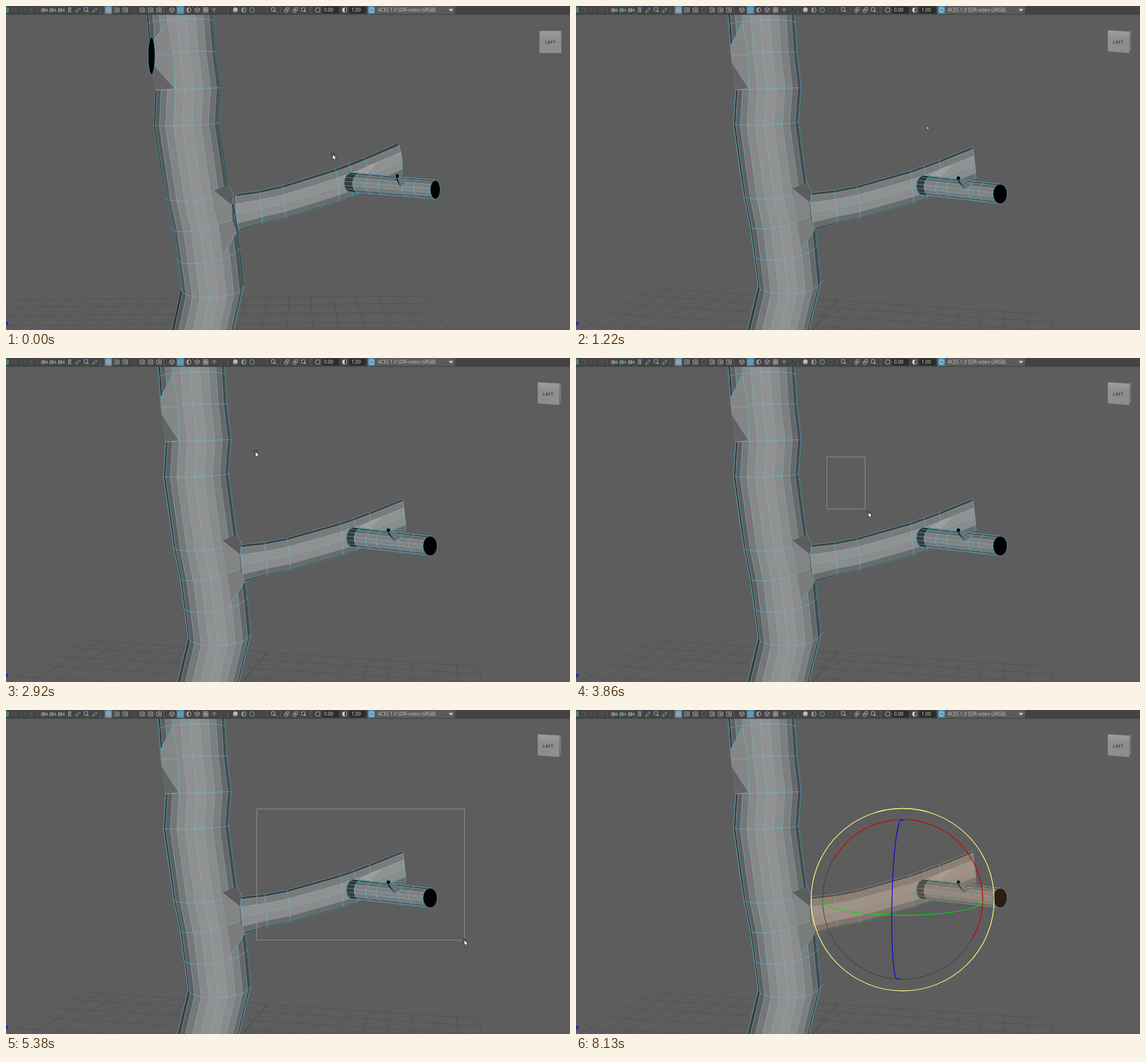
Animation, 986 px wide and 568 px high, one loop 9500 ms. Source, as an HTML page with a canvas:

```html
<!DOCTYPE html>
<html lang="en">
<head>
<meta charset="utf-8">
<title>Branch selection</title>
<style>
html, body { margin: 0; width: 100%; height: 100%; overflow: hidden; background: #5d5d5d; }
canvas, svg { position: absolute; left: 0; top: 0; width: 986px; height: 568px; }
text { font: 8.2px "Open Sans", "Noto Sans", sans-serif; fill: #e2e2e2; }
.mid { text-anchor: middle; }
</style>
</head>
<body>
<canvas id="view" width="986" height="568"></canvas>
<svg id="ui" viewBox="0 0 986 568"></svg>
<script>
const LOOP = 9500, TICK = 138.2;
const ctx = document.getElementById('view').getContext('2d');
const ui = document.getElementById('ui');
const lerp = (a, b, t) => a + (b - a) * t;
const mix = (a, b, t) => a.map((v, i) => Array.isArray(v) ? mix(v, b[i], t) : lerp(v, b[i], t));

// away: 1 before the camera orbit, 0 after it
let away = 1, selected = false;

const gray = g => selected
  ? `rgb(${.8 * g + 46},${.8 * g + 29},${.8 * g + 18})`
  : `rgb(${g},${g},${g})`;
const wire = () => selected ? 'rgba(112,178,188,.75)' : 'rgba(104,196,220,.75)';
const light = angle => 146 * Math.sin(Math.PI * angle) ** .62;

function poly(points, fill, stroke, width = .8, closed = true) {
  ctx.beginPath();
  points.forEach(p => ctx.lineTo(p[0], p[1]));
  if (closed) ctx.closePath();
  if (fill) {
    ctx.fillStyle = fill;
    ctx.fill();
  }
  if (stroke) {
    ctx.strokeStyle = stroke;
    ctx.lineWidth = width;
    ctx.stroke();
  }
}
const line = (...points) => poly(points, null, wire(), .8, false);

function disc(x, y, rx, ry) {
  ctx.beginPath();
  ctx.ellipse(x, y, rx, ry, 0, 0, 7);
  ctx.fillStyle = gray(0);
  ctx.fill();
  ctx.strokeStyle = wire();
  ctx.lineWidth = .9;
  ctx.stroke();
}

// Edge angles across the visible half of a tube, 0 to 1.
function edges(phase, gap) {
  const out = [0];
  for (let a = phase; a < .99; a += gap) if (a > .01) out.push(a);
  return [...out, 1];
}

const ring = (a, b, bowX, bowY, angles) => angles.map(t => {
  const f = (1 - Math.cos(Math.PI * t)) / 2, bow = Math.sin(Math.PI * t);
  return [lerp(a[0], b[0], f) + bowX * bow, lerp(a[1], b[1], f) + bowY * bow];
});

function tube(rows, angles, tone = () => 1) {
  for (let i = 0; i + 1 < rows.length; i++) {
    for (let j = 0; j + 1 < angles.length; j++) {
      const c = gray(light((angles[j] + angles[j + 1]) / 2) * tone(i));
      poly([rows[i][j], rows[i][j + 1], rows[i + 1][j + 1], rows[i + 1][j]], c, c, .6);
    }
  }
  rows.forEach(row => line(...row));
  angles.forEach((_, j) => line(...rows.map(row => row[j])));
}

function drawFloor() {
  const [a, b, c, d] = mix([[135, 494], [827, 541], [5, 568], [843, 615]],
    [[15, 515], [732, 508], [-105, 590], [783, 583]], away);
  for (let i = 0; i <= 20; i++) {
    const u = i / 20, s = u / (u + (1 - u) * 1.15);
    line.call(null);
    poly([mix(a, b, s), mix(c, d, s)], null, i === 10 ? '#3c3c3c' : '#4f4f4f', .8, false);
  }
  for (let i = 0; i < 5; i++) {
    const s = .165 * i + .013 * i * i;
    poly([mix(a, c, s), mix(b, d, s)], null, '#4f4f4f', .8, false);
  }
}

const swingTrunk = ([x, y]) => [x - (20 - .016 * y) * away, y + .02 * (y - 130) * away];

function drawTrunk() {
  const outline = [[265, 12], [267, 33], [271, 86], [279, 147], [275, 207], [293, 332], [304, 385], [311, 437], [318, 489], [294, 589]];
  const angles = edges(.03 - .022 * away, .091);
  tube(outline.map(([x, y]) => {
    const tilt = 4 + 22 * Math.exp(-(((y - 400) / 60) ** 2));
    return ring(swingTrunk([x, y]), swingTrunk([x + 117 - .013 * y, y - tilt]), 0, .055 * y - 8, angles);
  }), angles);

  const wide = ([x, y]) => swingTrunk([x + 11 * away, y]);
  const rim = [[270, 70], [271, 86], [272, 98], [279, 147]].map(swingTrunk);
  const [top, side, low] = [[291, 30], [301, 86], [302, 145]].map(wide);
  poly([rim[0], top, side, low, rim[2]], gray(134));
  poly([rim[2], low, rim[3]], gray(100));
  line(rim[0], top, side, low, rim[2]);
  line(rim[1], side);
  line(low, rim[3]);
  const hole = swingTrunk([273, 88]);
  if (away > .1) disc(hole[0], hole[1], 6 * away, 33);

  const [crest, notch, top0, mid, mid2, low0, tail, inner] = [[378, 320], [404, 310], [413, 327], [409, 345],
    [410, 370], [417, 392], [394, 428], [386, 377]].map(swingTrunk);
  poly([crest, notch, top0, mid], gray(92));
  poly([crest, mid, mid2, inner], gray(132));
  poly([inner, mid2, low0, tail], gray(124));
  line(notch, top0, mid, crest);
  line(inner, mid2);
  line(low0, tail);
}

function drawBranch() {
  const angles = edges(.18, .175);
  const rows = [0, 38, 78, 171, 195, 222, 280].map(u => {
    const x = 413 + u - 9 * away, y = 327 - .0171 * u ** 1.5 + (2 - .03 * u) * away;
    return ring([x, y], [x + 6, y + (u ? 57 : 65)], u ? 1 + .015 * u * away : -5, 0, angles);
  });
  tube(rows, angles);
  poly([[617, 297], [640, 284], [660, 277], [637, 299]].map(([x, y]) => [x - 6 * away, y - 5 * away]), gray(158));
}

function drawTwig() {
  const angles = edges(.04, .14);
  const ends = [.0, .1, .25, .39, .67, .81, 1];
  const place = v => [608 + 134 * v + (13 * v - 4) * away, 297 + 15 * v - (5 + 2 * v) * away];
  tube(ends.map(v => {
    const [x, y] = place(v);
    return ring([x, y], [x - 2 + v, y + 34.5 - v * away], 3 * v * away - 12, 0, angles);
  }), angles, i => i ? .9 : .42);
  const [x, y] = place(1);
  disc(x - .5, y + 17.5 - away / 2, 12.5 - 3.7 * away, 17.3 - .8 * away);

  const tip = [668.5 + 15.5 * away, 302 - 4 * away];
  const left = [679 + 10 * away, 322 - 4 * away], right = [692 + 7 * away, 314 - 2 * away];
  poly([[tip[0] - 3, tip[1] + 2], [tip[0] + 3, tip[1] - 1], right, left], gray(105), wire());
  poly([[tip[0] - 3, tip[1] + 2], [tip[0], tip[1] + 2], left], gray(15));
  line(tip, mix(left, right, .5));
  disc(...tip, 3.5, 3.7);
}

function drawCube() {
  const [a, b, c, d, e, f] = mix([[930, 43], [967, 45], [966, 82], [930, 79], [969.5, 44], [969.5, 77]],
    [[933, 44], [970, 44], [970, 82], [933, 82], [970, 44], [970, 82]], away);
  const fill = ctx.createLinearGradient(0, 43, 0, 82);
  fill.addColorStop(0, '#a0a0a0');
  fill.addColorStop(.35, '#8e8e8e');
  poly([b, e, f, c], '#707070', '#a0a0a0', .5);
  poly([a, b, c, d], fill, '#9a9a9a', .6);
}

function drawView(picked) {
  selected = false;
  ctx.fillStyle = '#5d5d5d';
  ctx.fillRect(0, 0, 986, 568);
  drawFloor();
  drawTrunk();
  selected = picked;
  drawBranch();
  drawTwig();
  selected = false;
  drawCube();
}

const rect = (x, y, w, h, fill, more = '') => `<rect x="${x}" y="${y}" width="${w}" height="${h}" fill="${fill}" ${more}/>`;
const path = (d, more) => `<path d="${d}" fill="none" ${more}/>`;
const label = (x, y, s, more = '') => `<text x="${x}" y="${y + 3}" ${more}>${s}</text>`;

const glyphs = {
  box: 'M-4-3.5h8v7h-8zM-1-1h3v2h-3z',
  ball: 'M-4 0a4 4 0 1 0 8 0a4 4 0 1 0-8 0z',
  half: 'M-4 0a4 4 0 1 0 8 0a4 4 0 1 0-8 0zM-1-3v6M-2-3v6',
  camera: 'M-5-2h6v5h-6zM-4-1h5M-4 1h5M2 0l3-2v5z',
  mark: 'M-2-4h4v8l-2-2l-2 2zM0-4v5',
  pen: 'M-4 4l1-3l5-5l2 2l-5 5z',
  grid: 'M-4-4h8v8h-8zM-4-1h8M-4 1h8M-1-4v8M1-4v8',
  cube: 'M0-4l4 2v4l-4 2l-4-2v-4zM-4-2l4 2l4-2M0 0v4',
  layers: 'M-4-1h5v5h-5zM-1-4h5v5h-5z',
  bulb: 'M-2-1a2 2 0 1 1 4 0l-1 2h-2zM-1 3h2M-4-1h-1M4-1h1',
  arrow: 'M-4-4h6v6h-6zM1 0l4 4M1 0v4'
};
// A trailing * marks an accented icon, a trailing - a disabled one.
const groups = [
  [0, 'box* box- ball- layers-'], [67, 'camera camera* camera mark pen* arrow* pen*'],
  [179, 'grid box box ball- box box box'], [290, 'cube cube* half cube grid bulb ball-'],
  [401, 'ball half ball* ball-'], [468, 'arrow'], [491, 'layers layers arrow'], [545, 'ball'], [592, 'half']
];
const tints = { '*': '#78c3d2', '-': '#565b5d' };

function toolbar() {
  let out = rect(0, 0, 986, 15.5, '#444');
  for (const x of [172.5, 298.5]) out += rect(x, 0, 13, 14, '#5285a6');
  for (const x of [55, 165, 276, 388, 456, 480, 532]) out += path(`M${x} 2v11`, 'stroke="#777" stroke-dasharray="2 1"');
  for (const [start, names] of groups) {
    names.split(' ').forEach((name, i) => {
      const color = tints[name.slice(-1)] || '#b8b8b8';
      out += `<g transform="translate(${start + 14.75 * i} 7)">${path(glyphs[name.replace(/\W/, '')], `stroke="${color}" stroke-width=".9"`)}</g>`;
    });
  }
  out += '<circle cx="401" cy="6" r="3.5" fill="#bbb"/><path d="M592 3a4 4 0 0 0 0 8z" fill="#ccc"/>';
  out += rect(553, 1, 29, 12, '#2b2b2b') + label(556, 7, '0.00') + rect(600, 1, 29, 12, '#2b2b2b') + label(604, 7, '1.00');
  out += rect(632.5, 0, 13, 14, '#5285a6') + '<circle cx="639" cy="7" r="5" fill="#7cc5d2"/>' +
    label(639, 6, 'ON', 'class="mid" style="font-size:4.5px;fill:#234"');
  out += rect(647, 0, 138, 14, '#5b5b5b') + label(650, 7, 'ACES 1.0 SDR-video (sRGB)', 'style="fill:#ccc"');
  return out + '<path d="M774 5h8l-4 5z" fill="#ccc"/>';
}

const radial = [
  ['Edge', 584, 160, 59], ['Object Mode', 647, 177, 90], ['Vertex', 504, 203, 64], ['UV', 660, 203, 52],
  ['Vertex Face', 498, 228, 83], ['Multi', 647, 228, 60], ['Face', 585, 246, 57]
];
const sections = [
  ['pCylinder1...'],
  ['Select', 'Select All', 'Deselect All', 'Select Hierarchy', 'Invert Selection'],
  ['Select Similar'],
  ['Make Live'],
  ['DG Traversal', 'Inputs', 'Outputs', 'Paint', 'Metadata', 'Actions', 'UV Sets', 'Color Sets', 'Time Editor'],
  ['Scene Assembly']
];

function menu() {
  const more = (x, y) => `<path d="M${x} ${y - 2.5}l3 2.5l-3 2.5z" fill="#e2e2e2"/>`;
  let out = '';
  for (const [name, x, y, w] of radial)
    out += rect(x + .5, y + .5, w - 1, 15, '#464646', `stroke="#111" stroke-width="1.3" data-item="${name}"`) +
      label(x + w / 2, y + 8, name, 'class="mid"');
  out += more(701.5, 211) + rect(549.5, 269.5, 129, 310, '#464646', 'stroke="#111" stroke-width="1.2"');
  let y = 278;
  sections.forEach((names, i) => {
    if (i) out += path(`M551 ${Math.round(y - 9.6) + .5}H678`, 'stroke="#313131"');
    for (const name of names) {
      out += label(569, y, name, name === 'Make Live' ? 'style="fill:#777"' : '');
      if (i > 3) out += more(668.5, y);
      y += 15.5;
    }
    y += 3.7;
  });
  out += rect(666.5, 374.5, 7, 7, 'none', 'stroke="#888"');
  return out + '<line id="stroke" x1="614" y1="211" stroke="#8c8c8c" stroke-width="1.5"/>' +
    rect(612.5, 209.5, 3, 3, '#555', 'stroke="#999" stroke-width=".7"');
}

function gizmo() {
  const at = deg => `${571 + 140 * Math.cos(deg * Math.PI / 180)} ${332 + 140 * Math.sin(deg * Math.PI / 180)}`;
  return '<circle cx="571" cy="332" r="140" fill="none" stroke="#3b3b3b"/>' +
    path(`M${at(-150.3)}A140 140 0 1 1 ${at(31.5)}`, 'stroke="#d40000" stroke-width="1.3"') +
    path('M431 334Q429 338 434 341C480 366 665 366 708 341Q713 337 709 334', 'stroke="#00e000" stroke-width="1.3"') +
    path('M572 194Q568 190 565 198C550 245 548 440 559 469Q562 474 565 470', 'stroke="#0000e0" stroke-width="1.3"') +
    '<circle cx="571" cy="332.5" r="160" fill="none" stroke="#ffff80" stroke-width="1.3"/>';
}

ui.innerHTML = toolbar() +
  label(0, 556, 'z', 'style="fill:#0000d8;font-weight:700"') +
  label(952, 63, 'LEFT', 'id="face" class="mid" style="font-size:7.5px;font-weight:700;letter-spacing:.5px;fill:#3c3c3c"') +
  `<g id="menu">${menu()}</g><g id="gizmo">${gizmo()}</g>` +
  rect(438.5, 173.5, 0, 0, 'none', 'id="marquee" stroke="#939393"') +
  `<g id="cursor"><path id="badge" d="M-2.5-2h5.5v2.5h-5.5z" fill="#777" stroke="#222" stroke-width=".8"/>
  <path id="arrow" d="M0 0V9.5L2.2 7.5L4 11.3L5.6 10.5L4 7H7z" fill="#fff" stroke="#111" stroke-width=".8"/></g>`;

// Pointer path as tick, x, y; straight moves in between.
const route = [
  [0, 571, 260], [1, 626, 279], [3, 612, 278], [4, 612, 278], [6, 613, 211], [12, 614, 211], [14, 600, 221],
  [16, 613, 252], [17, 613, 252], [19, 429, 179], [20, 421, 168], [21, 436, 164], [25, 438, 173], [28, 511, 270],
  [30, 699, 357], [33, 791, 393], [39, 801, 403], [54, 801, 403], [56, 846, 443], [58, 950, 560], [59, 1100, 700]
];

function pointerAt(k) {
  const i = route.findIndex(r => r[0] > k);
  if (i < 0) return route[route.length - 1].slice(1);
  const a = route[i - 1], b = route[i];
  return mix(a, b, (k - a[0]) / (b[0] - a[0])).slice(1);
}

const el = id => document.getElementById(id);
const show = (id, on) => el(id).style.display = on ? '' : 'none';
const items = [...ui.querySelectorAll('[data-item]')];
let last = -1;

function render(k) {
  const picked = k >= 48, pressed = k >= 9 && k < 18;
  away = (1 - Math.min(1, Math.max(0, (k - 1) / 3))) ** 3;
  drawView(picked);
  el('face').setAttribute('x', 948 + 4 * away);

  const [x, y] = pointerAt(k);
  el('cursor').setAttribute('transform', `translate(${x} ${y})`);
  el('arrow').setAttribute('transform', `scale(${pressed ? .55 : 1})`);
  show('badge', !pressed);

  show('menu', k >= 10 && k < 18);
  const hover = ['Vertex', 'Vertex Face', 'Face'][Math.min(k - 13, 2)];
  items.forEach(r => r.setAttribute('fill', r.dataset.item === hover ? '#5285a6' : '#464646'));
  el('stroke').setAttribute('x2', x);
  el('stroke').setAttribute('y2', y);

  show('marquee', k >= 26 && !picked);
  const lag = k < 33 ? 6 : 0;
  el('marquee').setAttribute('width', Math.max(0, x - lag - 438));
  el('marquee').setAttribute('height', Math.max(0, y - lag - 173));
  show('gizmo', picked);
}

const start = performance.now();
function frame() {
  const k = Math.floor(((performance.now() - start) % LOOP + 25) / TICK);
  if (k !== last) render(last = k);
  requestAnimationFrame(frame);
}
frame();
</script>
</body>
</html>
```
